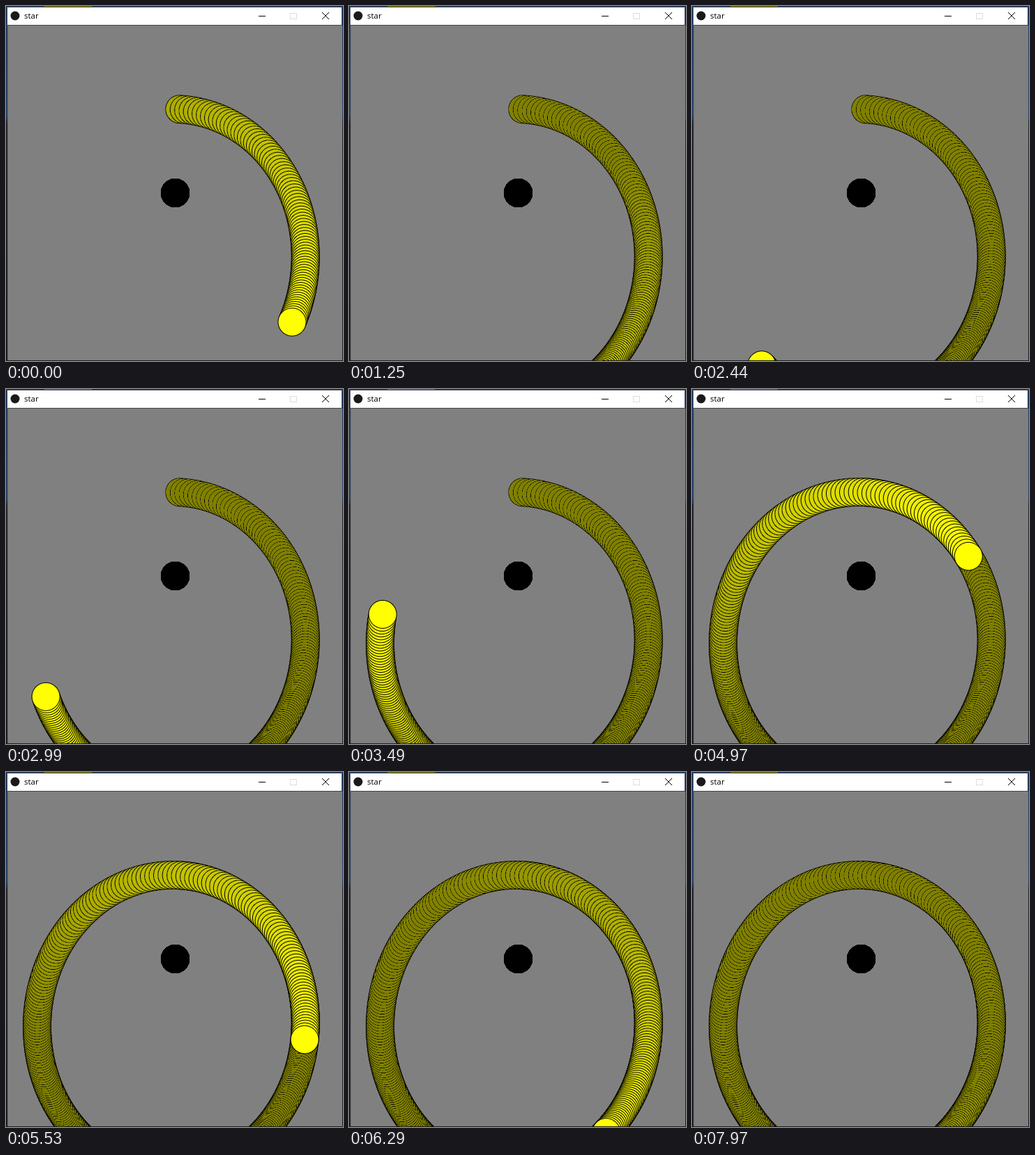
Write an HTML page with a canvas that moves like this. It is 483x508 px and loops after 8 s.

```html
<!DOCTYPE html>
<html>
<head>
<meta charset="utf-8">
<style>
  html, body { margin: 0; width: 100%; height: 100%; overflow: hidden; }
  svg, canvas { position: absolute; left: 0; top: 0; display: block; }
  canvas { left: 2px; top: 27px; }
</style>
</head>
<body>
<svg width="483" height="508" viewBox="0 0 483 508">
  <defs>
    <linearGradient id="edge" x2="0" y2="1">
      <stop offset="0" stop-color="#23395f"/>
      <stop offset=".31" stop-color="#2b426b"/>
      <stop offset=".33" stop-color="#24262b"/>
      <stop offset="1" stop-color="#1d1d20"/>
    </linearGradient>
  </defs>
  <rect width="483" height="508" fill="url(#edge)"/>
  <rect x="55" width="68" height="1" fill="#85800f"/>
  <rect x="1" y="1" width="481" height="1" fill="#3c424c"/>
  <rect x="2" y="2" width="479" height="25" fill="#fff"/>
  <circle cx="13" cy="14" r="6.5" fill="#1a1a1a"/>
  <text x="26" y="18" font-family="'Open Sans', 'Noto Sans', sans-serif" font-size="11.5">star</text>
  <g fill="none" stroke="#000">
    <path d="M362 14.5h10"/>
    <rect x="407.5" y="10.5" width="9" height="8" stroke="#ddd"/>
    <path d="M453 9l10 10M463 9l-10 10"/>
  </g>
</svg>
<canvas id="view" width="480" height="480"></canvas>
<script>
const SIZE = 480, MID = 240, GRAY = 128, PULL = 3416.5, START_SPEED = 6.4;
const LOOP = 8000, FIRST_STEP = 84, STEPS_PER_SHOT = 4.007;
const ctx = document.getElementById('view').getContext('2d');
const image = ctx.createImageData(SIZE, SIZE);
const light = new Float32Array(SIZE * SIZE);   // red and green, as last painted
const blue = new Float32Array(SIZE * SIZE);
const painted = new Int16Array(SIZE * SIZE);   // step of the last painting
const clamp = v => Math.max(0, Math.min(1, v));
let step, x, y, vx, vy;

function reset() {
  step = 0;
  x = MID; y = 120; vx = START_SPEED; vy = 0;
  painted.fill(0);
  light.fill(GRAY);
  blue.fill(GRAY);
  for (let j = 0; j < SIZE; j++)
    for (let i = 0; i < SIZE; i++)
      if (Math.hypot(i - MID, j - MID) < 20.9) light[j * SIZE + i] = blue[j * SIZE + i] = 0;
}

// Bright pixels sink by one level per step down to the gray; dark ones stay.
function faded(k) {
  const v = light[k];
  return v <= GRAY ? v : Math.max(GRAY, v - (step - painted[k]));
}

function paintPlanet() {
  const cx = Math.floor(x), cy = Math.floor(y);
  for (let j = Math.max(0, cy - 21); j <= Math.min(SIZE - 1, cy + 22); j++)
    for (let i = Math.max(0, cx - 21); i <= Math.min(SIZE - 1, cx + 22); i++) {
      const d = Math.hypot(i - x, j - y);
      if (d >= 21) continue;
      const k = j * SIZE + i;
      const fill = clamp(20.5 - d), line = clamp(Math.min(21 - d, d - 19));
      const old = faded(k);
      light[k] = (old + (255 - old) * fill) * (1 - line);
      blue[k] *= (1 - fill) * (1 - line);
      painted[k] = step;
    }
}

function advance() {
  const dx = MID - x, dy = MID - y, r = Math.hypot(dx, dy);
  vx += PULL * dx / r ** 3;
  vy += PULL * dy / r ** 3;
  x += vx;
  y += vy;
  step++;
  paintPlanet();
}

function show() {
  const data = image.data;
  for (let k = 0; k < light.length; k++) {
    data[4 * k] = data[4 * k + 1] = faded(k);
    data[4 * k + 2] = blue[k];
    data[4 * k + 3] = 255;
  }
  ctx.putImageData(image, 0, 0);
  // Window border along the top and left
  ctx.fillStyle = '#444';
  ctx.fillRect(0, 0, SIZE, 1);
  ctx.fillStyle = '#666';
  ctx.fillRect(0, 0, 1, SIZE);
}

let shown = -1;
function frame() {
  const shot = Math.floor((performance.now() % LOOP + 10) / 70);
  if (shot !== shown) {
    const goal = Math.round(FIRST_STEP + STEPS_PER_SHOT * shot);
    if (goal < step) reset();
    while (step < goal) advance();
    show();
    shown = shot;
  }
  requestAnimationFrame(frame);
}
reset();
frame();
</script>
</body>
</html>
```
